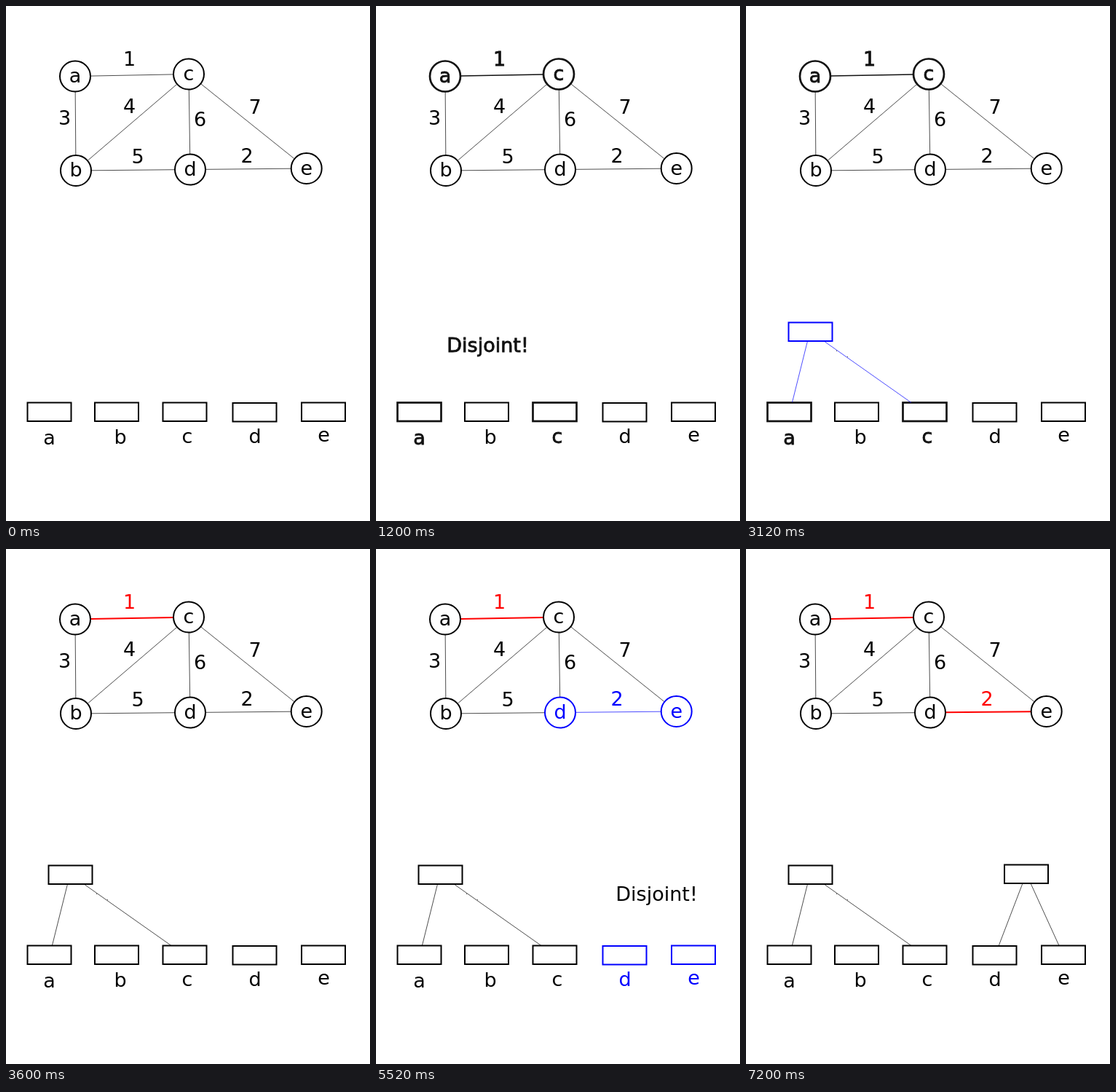
These frames come from a looping animation (500 px wide and 707 px high, 8 s). An HTML page:

```html
<!DOCTYPE html>
<html lang="en">
<head>
<meta charset="utf-8">
<title>Minimum spanning tree with disjoint sets</title>
<style>
  html, body { margin: 0; width: 100%; height: 100%; overflow: hidden; background: #fff; }
  svg { display: block; width: 500px; height: 707px; }
  g { --ink: #000; --box: 2; --edge: .7; --glyph: 0; }
  .bold { --ink: #111; --box: 2.7; --edge: 1.5; --glyph: .8; }
  .blue { --ink: #00f; }
  .red { --ink: #f00; --edge: 2; }
  circle, rect { fill: none; stroke: var(--ink); stroke-width: var(--box); }
  line { stroke: var(--ink); stroke-width: var(--edge); }
  text { font: 27px "DejaVu Sans", sans-serif; text-anchor: middle;
         fill: var(--ink); stroke: var(--ink); stroke-width: var(--glyph); }
</style>
</head>
<body>
<svg id="stage" viewBox="0 0 500 707"></svg>
<script>
const LOOP = 8000, STEP = 1200, RADIUS = 21;
const stage = document.getElementById('stage');

// name: node centre, letter baseline, box corner, box label position
const nodes = {
  a: { at: [95, 96.5], base: 105, box: [29.5, 544.5], label: [59.5, 601.5] },
  b: { at: [96, 226], base: 234, box: [122, 544.5], label: [157, 601] },
  c: { at: [251, 93.5], base: 102, box: [215.5, 544.5], label: [249, 600] },
  d: { at: [253, 224.5], base: 233, box: [311.5, 545], label: [342, 600] },
  e: { at: [412.7, 223], base: 231.5, box: [406, 544.5], label: [436.5, 598] }
};
// ends, weight, weight position
const edges = [
  ['ac', 1, 169.5, 82], ['de', 2, 331, 215], ['ab', 3, 80.5, 163], ['bc', 4, 169.5, 147],
  ['bd', 5, 181, 216], ['cd', 6, 266.5, 165], ['ce', 7, 342, 148]
];

const group = (style, ...parts) => `<g class="${style}">${parts.join('')}</g>`;
const text = (s, x, y) => `<text x="${x}" y="${y}">${s}</text>`;
const box = (x, y) => `<rect x="${x}" y="${y}" width="60" height="25.5"/>`;
const line = (x1, y1, x2, y2) => `<line x1="${x1}" y1="${y1}" x2="${x2}" y2="${y2}"/>`;

function edgeLine([from, to]) {
  const [x1, y1] = nodes[from].at, [x2, y2] = nodes[to].at;
  const k = (RADIUS + .5) / Math.hypot(x2 - x1, y2 - y1);
  const dx = (x2 - x1) * k, dy = (y2 - y1) * k;
  return line(x1 + dx, y1 + dy, x2 - dx, y2 - dy);
}

function draw(step) {
  const firstActive = step === 1 || step === 2;
  const secondActive = step === 4 || step === 5;
  const nodeStyle = name =>
    firstActive && 'ac'.includes(name) ? 'bold' :
    secondActive && 'de'.includes(name) ? 'blue' : '';
  const edgeStyle = ends =>
    ends === 'ac' ? (firstActive ? 'bold' : step > 2 ? 'red' : '') :
    ends === 'de' ? (secondActive ? 'blue' : step > 5 ? 'red' : '') : '';

  const parts = edges.map(([ends, weight, x, y]) =>
    group(edgeStyle(ends), edgeLine(ends), text(weight, x, y)));

  for (const [name, n] of Object.entries(nodes)) {
    parts.push(group(nodeStyle(name),
      `<circle cx="${n.at[0]}" cy="${n.at[1]}" r="${RADIUS}"/>`,
      text(name, n.at[0], n.base), box(...n.box), text(name, ...n.label)));
  }

  if (step === 1) parts.push(group('bold', text('Disjoint!', 153.5, 474.5)));
  if (step === 4) parts.push(group('', text('Disjoint!', 385.5, 482.5)));
  if (step > 1) {
    parts.push(group(step === 2 ? 'blue' : '', box(58.5, 434.5),
      line(84.5, 460, 63.5, 544), line(107, 460, 227, 544.5)));
    parts.push(group('', line(124, 473.5, 125, 473.5), line(139, 481.5, 140, 481.5)));
  }
  if (step > 4) {
    parts.push(group(step === 5 ? 'blue' : '', box(355, 433.5),
      line(380, 459, 347, 545), line(391, 459, 430, 544.5)));
  }
  stage.innerHTML = parts.join('');
}

let shown = -1;
function tick() {
  const step = Math.floor(performance.now() % LOOP / STEP);
  if (step !== shown) draw(shown = step);
  requestAnimationFrame(tick);
}
tick();
</script>
</body>
</html>
```
